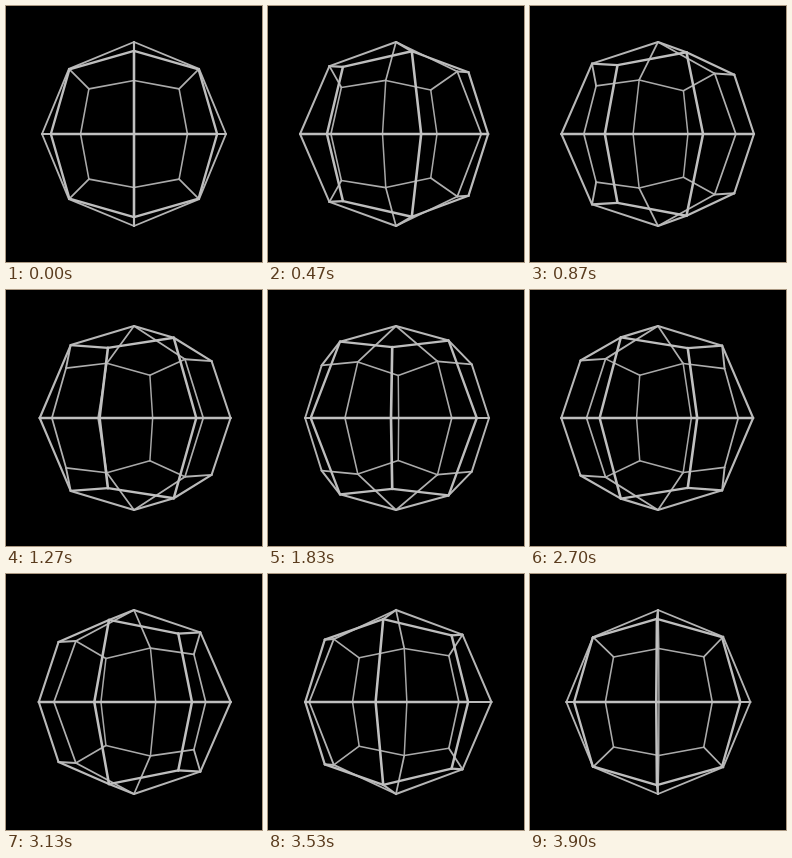
An HTML page with a canvas for the animation above (3.93 s loop, 256 px wide and 256 px high).

```html
<!DOCTYPE html>
<html lang="en">
<head>
<meta charset="utf-8">
<title>Rotating wireframe</title>
<style>
  html, body { margin: 0; width: 100%; height: 100%; overflow: hidden; background: #000; }
  canvas { display: block; width: 256px; height: 256px; }
</style>
</head>
<body>
<canvas id="stage" width="256" height="256"></canvas>
<script>
const LOOP = 3930, STEPS = 118;
const EYE = 3.25, FOCAL = 299, TUBE = 0.0205;
const ctx = document.getElementById('stage').getContext('2d');

// Every direction of a 3x3x3 grid, pushed out onto the unit sphere.
const points = [];
for (const x of [-1, 0, 1])
  for (const y of [-1, 0, 1])
    for (const z of [-1, 0, 1]) {
      const r = Math.hypot(x, y, z);
      if (r) points.push([x / r, y / r, z / r]);
    }

// Nearest neighbours form the 24 kite faces.
const dot = (a, b) => a[0] * b[0] + a[1] * b[1] + a[2] * b[2];
const edges = [];
points.forEach((a, i) => {
  for (let j = i + 1; j < points.length; j++)
    if (dot(a, points[j]) > 0.6) edges.push([i, j]);
});

// A quarter turn per loop, running slightly ahead in the middle.
function turn(p) {
  return (90 * p + 0.9 * Math.sin(Math.PI * p)) * Math.PI / 180;
}

function project([x, y, z], angle) {
  const c = Math.cos(angle), s = Math.sin(angle);
  const depth = z * c - x * s;
  const scale = FOCAL / (EYE - depth);
  return { x: 128 + (x * c + z * s) * scale, y: 128 - y * scale, depth, scale };
}

function draw(step) {
  const angle = turn(step / STEPS);
  const view = points.map(p => project(p, angle));
  const lines = edges.map(([i, j]) => [view[i], view[j]]);
  lines.sort((p, q) => p[0].depth + p[1].depth - q[0].depth - q[1].depth);

  ctx.fillStyle = '#000';
  ctx.fillRect(0, 0, 256, 256);
  ctx.lineCap = 'round';
  for (const [a, b] of lines) {
    const near = (a.depth + b.depth + 2) / 4;
    const tone = Math.round(165 + 30 * near);
    ctx.strokeStyle = `rgb(${tone},${tone},${tone})`;
    ctx.lineWidth = TUBE * (a.scale + b.scale) / 2;
    ctx.beginPath();
    ctx.moveTo(a.x, a.y);
    ctx.lineTo(b.x, b.y);
    ctx.stroke();
  }
}

function tick() {
  const t = Math.floor(performance.now() % LOOP / 10) * 10;
  draw(Math.floor((t + 5) * 0.03));
  requestAnimationFrame(tick);
}
tick();
</script>
</body>
</html>
```
